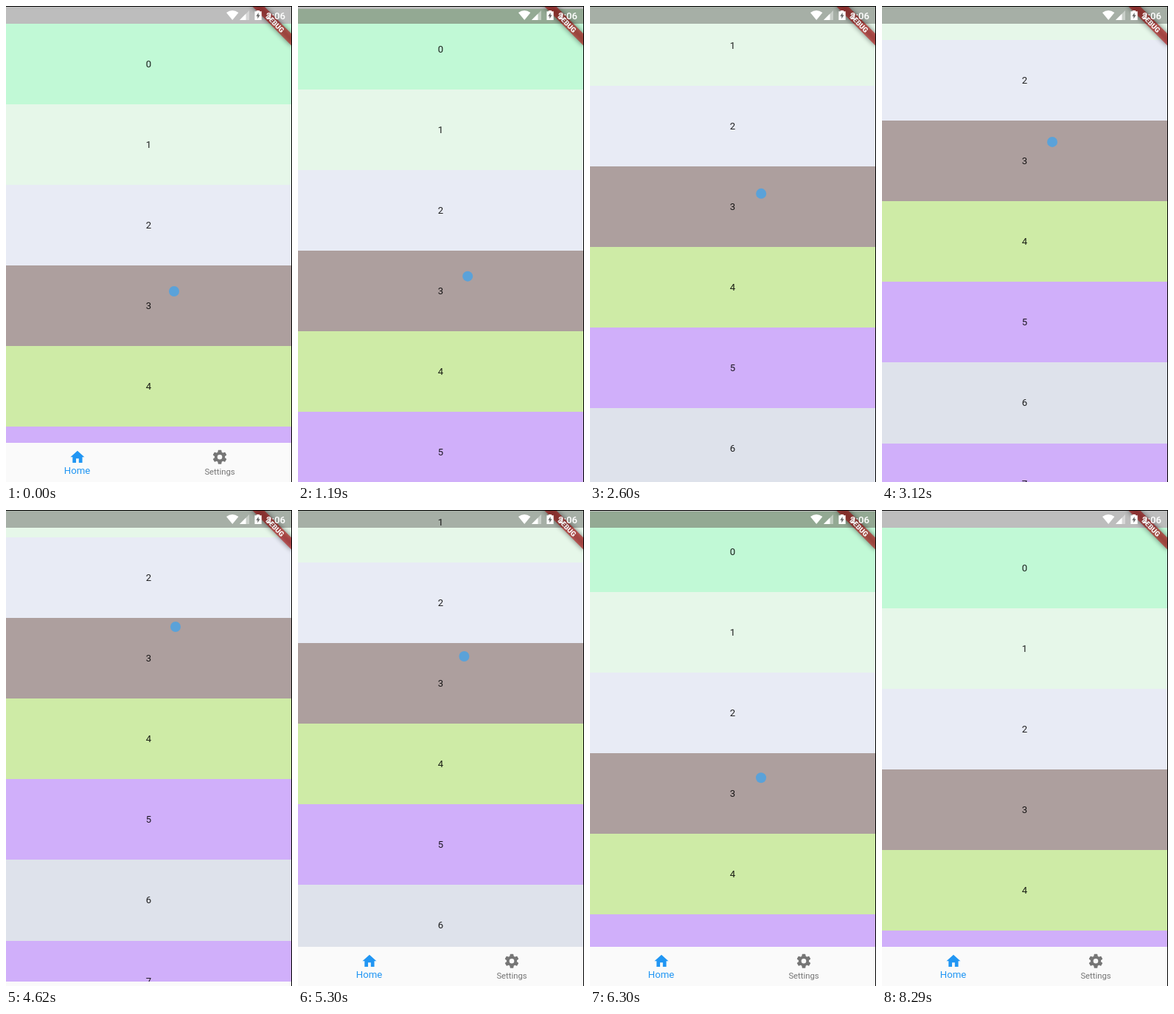
An HTML page that plays this animation: 388 by 644 pixels, repeating every 8.88 s.

```html
<!DOCTYPE html>
<html lang="en">
<head>
<meta charset="utf-8">
<title>Hiding navigation bar</title>
<style>
  html, body { margin: 0; width: 100%; height: 100%; overflow: hidden; background: #fafafa; }
  svg { display: block; font-family: Roboto, sans-serif; }
  text { text-anchor: middle; }
  .crisp { shape-rendering: crispEdges; }
</style>
</head>
<body>
<svg width="388" height="644" viewBox="0 0 388 644">
  <defs>
    <clipPath id="statusClip"><rect width="388" height="24"/></clipPath>
    <filter id="blur" x="-50%" y="-200%" width="200%" height="500%"><feGaussianBlur stdDeviation="3.7"/></filter>
    <path id="tooth" d="M-2.9-6.8L-2.4-9.6Q-2.4-10-2-10H2Q2.4-10 2.4-9.6L2.9-6.8z"/>
  </defs>

  <g id="rows" class="crisp"></g>
  <g clip-path="url(#statusClip)">
    <rect width="388" height="24" fill="#bdbdbd"/>
    <g id="tints" class="crisp"></g>
  </g>
  <g id="labels" font-size="13.2" fill="#000" fill-opacity=".87"></g>

  <g id="nav">
    <rect y="591" width="388" height="54" fill="#fafafa"/>
    <g fill="#2196f3">
      <path transform="translate(85.6 599) scale(.944)" d="M10 20v-6h4v6h5v-8h3L12 3 2 12h3v8z"/>
      <text x="96.6" y="633" font-size="13.2">Home</text>
    </g>
    <g fill="#757575">
      <g id="gear" transform="translate(290 610.2) scale(.944)">
        <circle r="5.5" fill="none" stroke="#757575" stroke-width="4"/>
      </g>
      <text x="290" y="634" font-size="11.3">Settings</text>
    </g>
  </g>

  <g transform="translate(387 0) rotate(45)">
    <rect x="-38" y="26.4" width="76" height="11.3" fill="#000" fill-opacity=".5" filter="url(#blur)"/>
    <rect x="-38" y="26.4" width="76" height="11.3" fill="#b71c1c" fill-opacity=".627"/>
    <text x="1" y="35.5" font-size="9.6" font-weight="900" fill="#fff">DEBUG</text>
  </g>
  <path d="M334 0h16l24 24h-16z" opacity=".1"/>

  <g fill="#fff">
    <path d="M299 9Q307 3 315.4 9L307.2 19z"/>
    <path d="M317 19L330 6V19z" opacity=".4"/>
    <path d="M317 19L325.5 10.5V19z"/>
    <path d="M340 6h4v1.3h2.7v11.7h-9.3V7.3h2.6z"/>
    <path d="M342.6 9v3.3h2l-3.3 5v-3.6h-2z" fill="#666"/>
    <text x="366" y="17.5" font-size="13.2" font-weight="500">2:06</text>
  </g>

  <circle id="dot" r="7" fill="#5aa2d9"/>
  <path class="crisp" d="M0 0H388V644H387V1H0z"/>
</svg>
<script>
const LOOP = 8880, DOT_GONE = 8290, ROW = 109.08, TOP = 24, NAV = 53;
const colors = ['#c1f9d6', '#e6f7e9', '#e8ebf5', '#ad9f9e', '#ceeba6', '#d0affa', '#dee2eb', '#d0affa'];
const tints = ['#93a993', '#a6afa6'];

// Drag path: time, pointer x, pointer y, scroll offset (below zero is overscroll).
const path = [
  [90, 228, 386, 0],
  [910, 230, 367, 19],
  [1040, 230, 367, 19],
  [2040, 233, 325, 60],
  [3120, 231, 184, 196],
  [3640, 230, 152, 210],
  [4200, 230, 152, 210],
  [4620, 230, 158, 205],
  [5860, 222, 257, 119],
  [6300, 232, 362, 22],
  [6870, 252, 450, -64],
  [7560, 382, 60, -64],
  [7760, 367, 7, -64],
  [DOT_GONE, 309, 7, -64],
];

const $ = id => document.getElementById(id);
function add(parent, tag, attrs, text = '') {
  const node = document.createElementNS('http://www.w3.org/2000/svg', tag);
  for (const key in attrs) node.setAttribute(key, attrs[key]);
  node.textContent = text;
  parent.append(node);
}

const rowTop = i => Math.round(TOP + i * ROW);
const addRow = (parent, fill, i) =>
  add(parent, 'rect', { y: rowTop(i), width: 388, height: rowTop(i + 1) - rowTop(i), fill });
colors.forEach((color, i) => {
  addRow($('rows'), color, i);
  add($('labels'), 'text', { x: 193.5, y: rowTop(i) + 59 }, i);
});
tints.forEach((tint, i) => addRow($('tints'), tint, i));
for (let a = 0; a < 360; a += 60) add($('gear'), 'use', { href: '#tooth', transform: `rotate(${a})` });

// Monotone cubic curve through one column of the path.
function follow(col, t) {
  const last = path.length - 1;
  if (t <= path[0][0]) return path[0][col];
  if (t >= path[last][0]) return path[last][col];
  const slope = i => (path[i + 1][col] - path[i][col]) / (path[i + 1][0] - path[i][0]);
  const tangent = i => {
    if (i === 0 || i === last) return 0;
    const a = slope(i - 1), b = slope(i);
    return a * b > 0 ? 2 * a * b / (a + b) : 0;
  };
  const i = path.findIndex(p => p[0] > t) - 1;
  const d = path[i + 1][0] - path[i][0], u = (t - path[i][0]) / d, w = 1 - u;
  return path[i][col] * (1 + 2 * u) * w * w + tangent(i) * d * u * w * w
       + path[i + 1][col] * u * u * (3 - 2 * u) - tangent(i + 1) * d * u * u * w;
}

const ramp = (t, start) => Math.min(1, Math.max(0, (t - start) / 540));
const hidden = t => ramp(t, 330) - ramp(t, 4560);
const move = (id, x, y) => $(id).setAttribute('transform', `translate(${x} ${y})`);

function draw(now) {
  const t = now % LOOP;
  const scroll = Math.max(0, Math.round(follow(3, t)));
  for (const id of ['rows', 'tints', 'labels']) move(id, 0, -scroll);
  move('nav', 0, Math.round(NAV * hidden(t)));
  move('dot', follow(1, t), follow(2, t));
  $('dot').style.display = t < DOT_GONE ? '' : 'none';
  requestAnimationFrame(draw);
}
draw(0);
</script>
</body>
</html>
```
